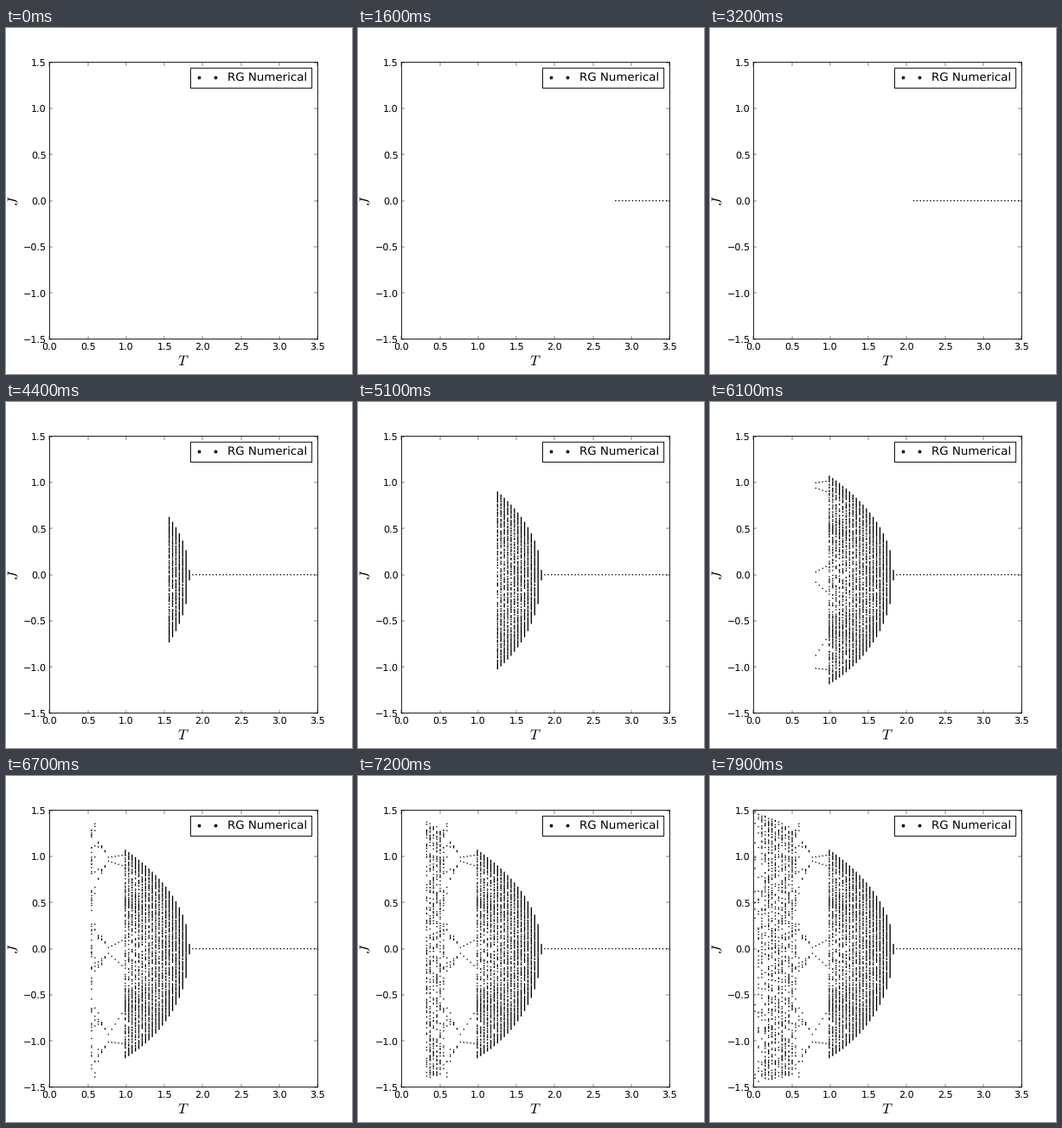
These frames come from a looping animation (400 px wide and 400 px high, 8000 ms). A matplotlib script:

```python
import numpy as np
import matplotlib.pyplot as plt
from matplotlib.animation import FuncAnimation

STEPS = 80
DPI = 200 / 3
PX = 72 / DPI                      # points per pixel
DOT = 1.33                         # dot size in pixels
HALF = DOT / 2 * 3 / 320           # half a dot in units of J
SHIFT = 1 / 3 / 400                # sub-pixel offset of the axes

T_CRITICAL = 1.8275
T_WINDOW = 0.97                    # the periodic window lies below this
T_CROSSING = 0.77                  # its branches are closest here
T_CHAOS = 0.57

plt.rcParams.update({
    "font.family": "DejaVu Sans", "font.size": 12,
    "mathtext.fontset": "cm", "text.hinting": "none",
})

rng = np.random.default_rng(11)


def envelope(t):
    """Centre and half height of the band at temperature t."""
    d = T_CRITICAL - t
    top = np.sqrt(d) * (1.22 - 0.065 * d)
    low = -np.sqrt(d) * (1.47 - 0.215 * d)
    return (top + low) / 2, (top - low) / 2


def quasi_periodic(t, count=220):
    mid, amp = envelope(t)
    golden = (np.sqrt(5) - 1) / 2
    phase = 2 * np.pi * (np.arange(count) * golden + rng.normal(0, 0.003, count))
    locking = 0.12 * np.clip((1.4 - t) / 0.4, 0, 1)
    return mid + amp * np.sin(phase + locking * np.sin(6 * phase))


def periodic(t):
    """Three pairs of branches that part on both sides of the crossing."""
    u = (t - T_CROSSING) / 0.2
    spread = u if u > 0 else -1.8 * u
    values = []
    for centre, drift, gap, growth in ((0.97, -0.015, 0.02, 0.04 if u > 0 else 0.15),
                                       (-0.02, -0.03, 0.03, 0.12),
                                       (-0.97, 0.12 * (u > 0), 0.04, 0.14)):
        half = gap + growth * spread
        values += [centre + drift * u - half, centre + drift * u + half]
    if u > 0:
        return np.array(values)
    values = np.repeat(values, 4)
    return values + rng.normal(0, 0.1 * u * u, len(values))


def chaotic(t):
    mid, amp = envelope(t)
    count = int(rng.uniform(70, 150) * min(1, t / 0.1))
    return mid + amp * (2 * rng.beta(0.8, 0.8, count) - 1)


def couplings(t):
    if t > T_CRITICAL:
        return np.zeros(1)
    if t > T_WINDOW:
        return quasi_periodic(t)
    return periodic(t) if t > T_CHAOS else chaotic(t)


def strokes(t):
    """Vertical strokes for one column; touching dots become one stroke."""
    values = np.sort(couplings(t))
    runs = np.split(values, np.flatnonzero(np.diff(values) > 2 * HALF) + 1)
    return [[(t, run[0] - HALF), (t, run[-1] + HALF)] for run in runs]


columns = [strokes(t) for t in np.linspace(3.5, 0.02, STEPS)]

fig = plt.figure(figsize=(6, 6), dpi=DPI, facecolor="white")
ax = fig.add_axes([0.125 + SHIFT, 0.1 + SHIFT, 0.775, 0.8])
ax.set(xlim=(0, 3.5), ylim=(-1.5, 1.5),
       xticks=np.arange(0, 3.6, 0.5), yticks=np.arange(-1.5, 1.6, 0.5))
ax.tick_params(direction="in", length=4, width=0.5, pad=4, top=True, right=True)
for spine in ax.spines.values():
    spine.set(linewidth=1.0, snap=False)
fig.text(205 / 400, 1 - 385.5 / 400, "$T$", size=18, ha="center", va="center")
fig.text(8.5 / 400, 0.5, "$J$", size=18, ha="center", va="center", rotation=90)

dots = ax.vlines([], [], [], colors="black", linewidth=DOT * PX)
dots.set_snap(False)

key, = ax.plot([], [], "ko", markersize=3.8 * PX, markeredgewidth=0, label="RG Numerical")
legend = ax.legend(handles=[key], loc="upper right", numpoints=2, fontsize=14.4,
                   fancybox=False, framealpha=1, edgecolor="black")
legend.get_frame().set(linewidth=1.0, snap=False)


def update(frame):
    dots.set_segments(sum(columns[:frame + 1], []))
    return dots,


anim = FuncAnimation(fig, update, frames=STEPS, interval=100, repeat=True,
                     repeat_delay=0, blit=False)
plt.show()
```
